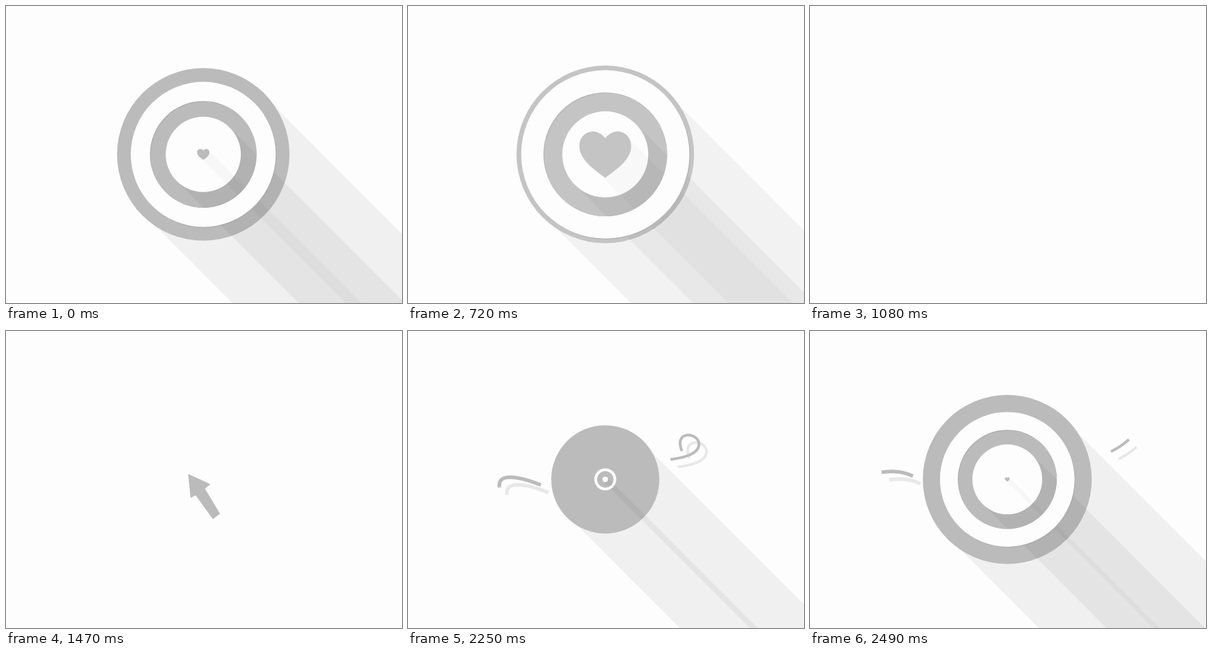
An HTML page with a canvas for the animation above (2520 ms loop, 658x493 px).

```html
<!DOCTYPE html>
<html lang="en">
<head>
<meta charset="utf-8">
<title>Target and heart</title>
<style>
  html, body { margin: 0; width: 100%; height: 100%; overflow: hidden; background: #fdfdfd; }
  canvas { display: block; }
</style>
</head>
<body>
<canvas id="stage" width="658" height="493"></canvas>
<script>
const ctx = document.getElementById('stage').getContext('2d');
// The story runs on from START; SKIP is the short cut in it where the loop wraps.
const LOOP = 2520, START = 1350, SKIP = 30, FADE = 3150;
const CX = 327.8, CY = 246.3, HEART = 43;
const PAPER = '#fdfdfd', GREY = '#bbb', RIM = '#acacac';

// Streak paths: a start point, then cubic segments; lead is the head's segment at mid-flight.
const streaks = [
  { width: 6, lead: 1, start: [221.5, 256], curves: [
    [190, 243, 148, 233, 152, 259],
    [156, 285, 215, 263, 171, 241],
    [155, 233, 137, 232, 119, 234.5]] },
  { width: 4.5, lead: 2, start: [435, 213.3], curves: [
    [462, 210, 483.5, 203, 483.5, 187.5],
    [483.5, 169, 441, 163, 455, 199],
    [461, 212, 485, 209, 500, 200],
    [511, 195, 521, 188, 530, 180]] }
];

const clamp = x => Math.min(1, Math.max(0, x));
const grow = (t, start, size, tau, power = 1) =>
  t < start ? 0 : size * (1 - Math.exp(-(((t - start) / tau) ** power)));
const spring = (t, from, to, tau, omega) =>
  to + (from - to) * Math.exp(-t / tau) * Math.cos(omega * t);
const easeInOut = p => p < 0.5 ? 2 * p * p : 1 - 2 * (1 - p) ** 2;

function circle(r, dx = 0) {
  ctx.beginPath();
  ctx.arc(CX + dx, CY + dx, r, 0, 7);
}

function disc(r, color, dx) {
  circle(r, dx);
  ctx.fillStyle = color;
  ctx.fill();
}

function inside(r, draw) {
  ctx.save();
  circle(r);
  ctx.clip();
  draw();
  ctx.restore();
}

// Long diagonal shadow between two edges measured across its direction.
function shadow(from, to, alpha) {
  ctx.save();
  ctx.translate(CX, CY);
  ctx.rotate(Math.PI / 4);
  ctx.fillStyle = `rgba(0,0,0,${alpha})`;
  ctx.fillRect(0, from, 700, to - from);
  ctx.restore();
}

const discShadow = r => shadow(-r, r, 0.05);
const heartShadow = (scale, alpha) => shadow(-46 * scale, 30 * scale, alpha);

const heartShape = new Path2D(
  'M0-27C-6-34-13-38-20-38C-33-38-43-28-43-14C-43 10-18 25 0 39C18 25 43 10 43-14C43-28 33-38 20-38C13-38 6-34 0-27Z');
const arrowShape = new Path2D('M0 0L37 17L28 24.5L53 66L41 75L12.5 35.5L4 40Z');

function place(shape, x, y, scale) {
  ctx.save();
  ctx.translate(x, y);
  ctx.scale(scale, scale);
  ctx.fillStyle = GREY;
  ctx.fill(shape);
  ctx.restore();
}

function streakPoint({ start, curves }, u) {
  const i = Math.min(Math.floor(u), curves.length - 1), s = u - i, r = 1 - s;
  const [x0, y0] = i ? curves[i - 1].slice(4) : start;
  const [x1, y1, x2, y2, x3, y3] = curves[i];
  const mix = (a, b, c, d) => r * r * r * a + 3 * r * r * s * b + 3 * r * s * s * c + s * s * s * d;
  return [mix(x0, x1, x2, x3), mix(y0, y1, y2, y3)];
}

// The head draws the streak on first, then the tail follows it to the last segment.
function drawStreak(streak, travel) {
  const { lead, width } = streak, count = streak.curves.length, steps = 60;
  const tail = clamp(travel) * (count - 1);
  const head = lead * clamp(1 + 3 * travel) + clamp(travel) * (count - lead);
  const line = new Path2D();
  for (let i = 0; i <= steps; i++) {
    line.lineTo(...streakPoint(streak, tail + (head - tail) * i / steps));
  }
  ctx.lineWidth = width;
  for (const [offset, color] of [[12.5, '#e8e8e8'], [0, GREY]]) {
    ctx.save();
    ctx.translate(offset, offset);
    ctx.strokeStyle = color;
    ctx.stroke(line);
    ctx.restore();
  }
}

function drawArrow(t) {
  const dt = t - START;
  const x = spring(dt, -30, CX, 82, 0.0104);
  const y = spring(dt, 225, CY, 200, 0.0056);
  place(arrowShape, x, y, 1 - easeInOut(clamp((t - 1980) / 150)));
}

function drawTarget(t) {
  const outer = grow(t, 2143, 147.5, 115);
  const gap = grow(t, 2228, 140, 164);
  const inner = grow(t, 2228, 103, 164);
  const core = grow(t, 2241, 71.5, 150);
  const heart = grow(t, 2400, 1, 290, 2);

  shadow(3 - outer, outer - 3, 0.05);
  disc(outer, GREY);
  discShadow(core);
  heartShadow(heart, 0.03);

  inside(outer, () => disc(gap, RIM, gap / 90));
  disc(gap, PAPER);

  disc(inner, RIM);
  inside(inner, () => {
    disc(inner, GREY, inner / 80);
    discShadow(core);
    heartShadow(heart, 0.03);
  });

  disc(core, PAPER);
  inside(core, () => heartShadow(heart, 0.025));
  place(heartShape, CX, CY, heart);
}

function cover(alpha) {
  ctx.globalAlpha = alpha;
  ctx.fillStyle = PAPER;
  ctx.fillRect(0, 0, 658, 493);
  ctx.globalAlpha = 1;
}

function draw(now) {
  const time = now % LOOP;
  const t = time < START ? time + LOOP + SKIP : time;
  cover(1);
  if (t < 2143) drawArrow(t);
  else drawTarget(t);
  if (t > 2170 && t < LOOP) streaks.forEach(s => drawStreak(s, (t - 2250) / 240));
  cover(easeInOut(clamp((t - FADE) / 480)));
}

const begin = performance.now();
function frame() {
  draw(performance.now() - begin);
  requestAnimationFrame(frame);
}
frame();
</script>
</body>
</html>
```
